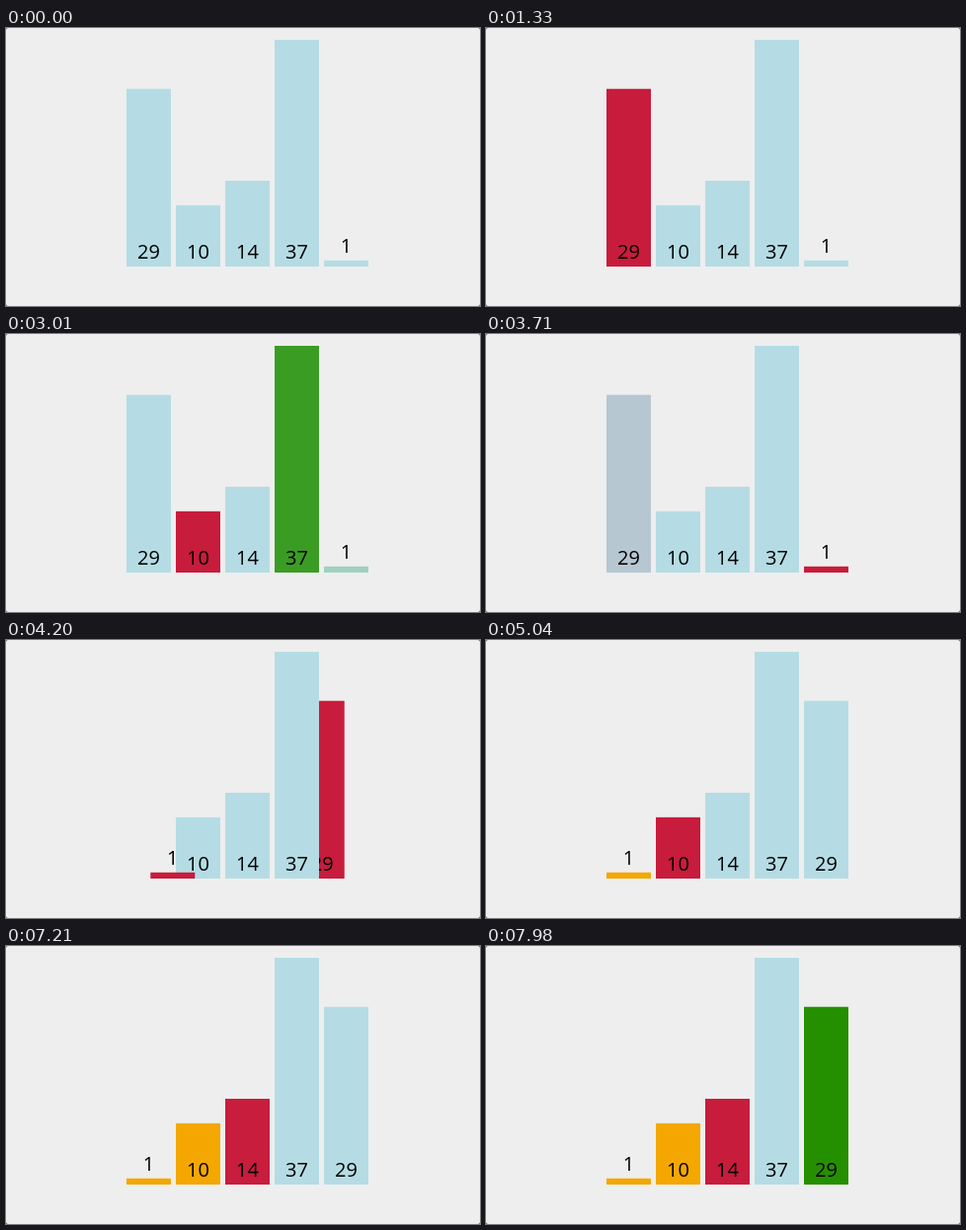
An HTML page that plays this animation: 480 by 282 pixels, repeating every 8 s.

```html
<!DOCTYPE html>
<html lang="en">
<head>
<meta charset="utf-8">
<title>Selection sort</title>
<style>
  html, body { margin: 0; width: 100%; height: 100%; overflow: hidden; background: #444; }
  svg { display: block; width: 480px; height: 282px; background: #eee; border-radius: 2px; }
  text { font: 20px "Open Sans", "Noto Sans", sans-serif; text-anchor: middle; }
</style>
</head>
<body>
<svg viewBox="0 0 480 282"></svg>
<script>
const LOOP = 8000, TICK = 70, FADE = 250;
const LEFT = 122, PITCH = 50, WIDTH = 45, FLOOR = 242, UNIT = 230 / 37;

const BLUE = [181, 220, 228];
const RED = [200, 28, 60];
const GREEN = [36, 144, 0];
const ORANGE = [244, 167, 0];

const values = [29, 10, 14, 37, 1];

// [start in ms, { value: new colour, or new slot when a number }]
const steps = [
  [1045, { 29: RED }],
  [1455, { 10: GREEN }],
  [1788, { 29: BLUE, 10: RED }],
  [2160, { 14: GREEN }],
  [2515, { 14: BLUE, 37: GREEN }],
  [2925, { 37: BLUE, 1: GREEN }],
  [3285, { 10: BLUE, 1: RED }],
  [3635, { 29: RED }],
  [4028, { 29: 4, 1: 0 }],
  [4395, { 29: BLUE, 1: ORANGE }],
  [4755, { 10: RED }],
  [5105, { 14: GREEN }],
  [5455, { 14: BLUE, 37: GREEN }],
  [5865, { 37: BLUE, 29: GREEN }],
  [6225, { 29: BLUE }],
  [6575, { 10: ORANGE }],
  [6985, { 14: RED }],
  [7318, { 37: GREEN }],
  [7670, { 37: BLUE, 29: GREEN }]
];

const svg = document.querySelector("svg");

function add(parent, tag, attrs) {
  const node = document.createElementNS("http://www.w3.org/2000/svg", tag);
  for (const key in attrs) node.setAttribute(key, attrs[key]);
  return parent.appendChild(node);
}

const bars = values.map((value, slot) => {
  const group = add(svg, "g");
  const height = value * UNIT;
  const rect = add(group, "rect", { y: FLOOR - height, width: WIDTH, height });
  const label = add(group, "text", { x: WIDTH / 2, y: height < 20 ? 227.5 : 234 });
  label.textContent = value;
  return { value, slot, group, rect };
});

const clamp = p => Math.min(1, Math.max(0, p));
const ease = p => p < 0.5 ? 4 * p ** 3 : 1 - 4 * (1 - p) ** 3;
const mix = (a, b, p) => a + (b - a) * p;

function draw(time) {
  for (const { value, slot, group, rect } of bars) {
    let place = slot, color = BLUE;
    for (const [start, changes] of steps) {
      if (time <= start || !(value in changes)) continue;
      const goal = changes[value];
      const p = ease(clamp((time - start) / FADE));
      if (typeof goal === "number") place = mix(place, goal, p);
      else color = color.map((c, i) => mix(c, goal[i], p));
    }
    group.setAttribute("transform", `translate(${LEFT + place * PITCH} 0)`);
    rect.setAttribute("fill", `rgb(${color.map(Math.round)})`);
  }
}

const origin = performance.now();

function frame() {
  const time = (performance.now() - origin) % LOOP;
  draw(Math.floor(time / TICK) * TICK);
  requestAnimationFrame(frame);
}
frame();
</script>
</body>
</html>
```
